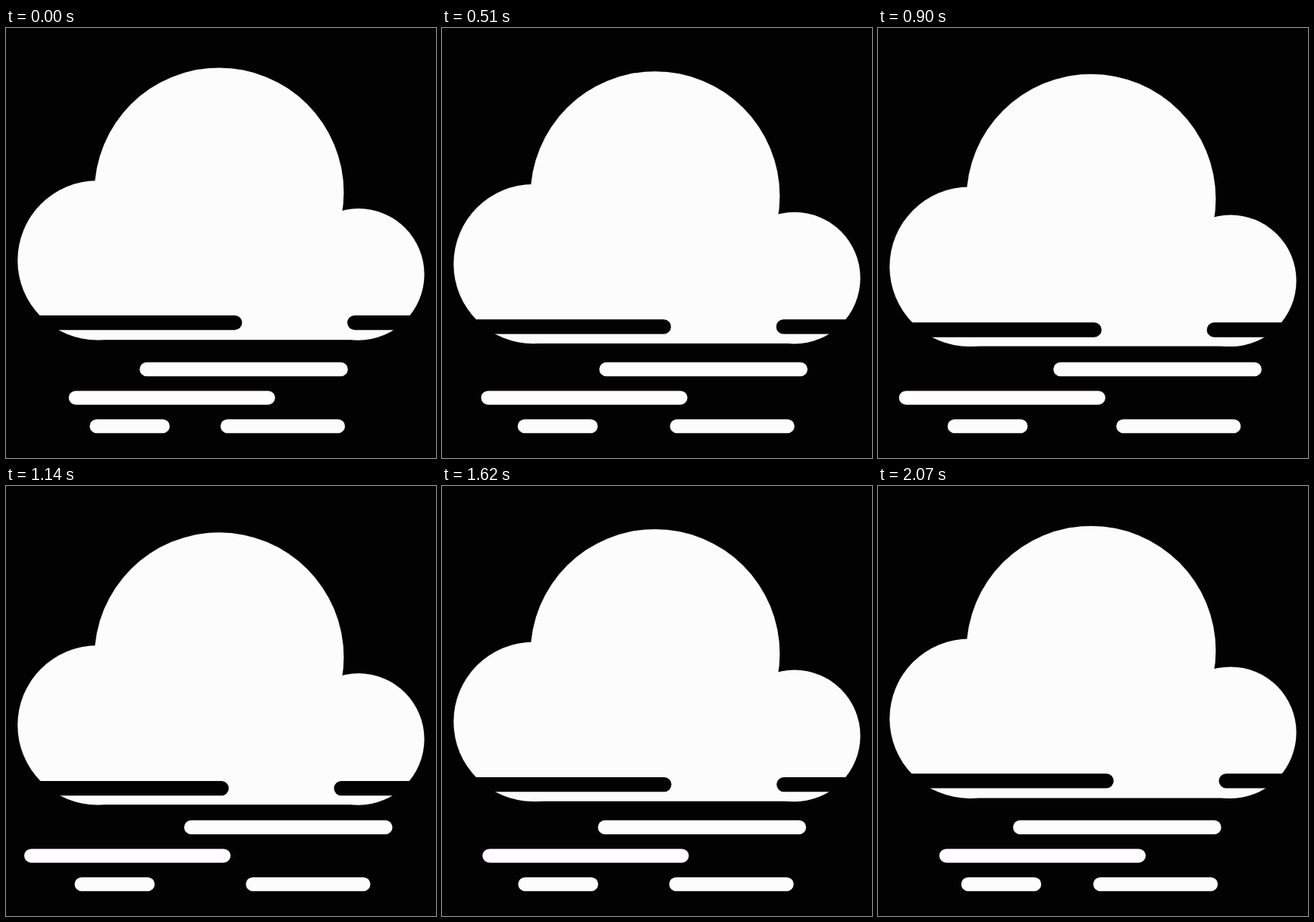
Write an HTML page that moves like this. It is 567 by 567 pixels and loops after 2.1 s.

```html
<!DOCTYPE html>
<html lang="en">
<head>
<meta charset="utf-8">
<title>Foggy cloud</title>
<style>
  html, body { margin: 0; height: 100%; overflow: hidden; background: #020202; }
  svg { display: block; width: 100vw; height: 100vh; }
</style>
</head>
<body>
<svg viewBox="0 0 567 567" fill="#fcfcfc">
  <g data-dy="9.8">
    <circle cx="281" cy="216.8" r="164.4"/>
    <circle cx="120.5" cy="306.4" r="105.2"/>
    <circle cx="464.8" cy="324.9" r="86.8"/>
    <rect x="120" y="250" width="345" height="161.2"/>
  </g>
  <g data-dx="-19.2" data-dy="11" fill="#020202">
    <rect x="-40" y="378.9" width="351.3" height="19.3" rx="9.65"/>
    <rect x="450" y="378.9" width="180" height="19.3" rx="9.65"/>
  </g>
  <rect data-dx="64.2" x="176.2" y="440.8" width="274.6" height="18.4" rx="9.2"/>
  <rect data-dx="-64.2" x="82.7" y="478.4" width="272.1" height="18.4" rx="9.2" fill="#fffdff"/>
  <rect data-dx="-21.7" x="110.3" y="515.9" width="105.6" height="18.4" rx="9.2"/>
  <rect data-dx="36.6" x="282.8" y="515.9" width="164.2" height="18.4" rx="9.2"/>
</svg>
<script>
  const PERIOD = 2100, STEP = 30;
  const movers = document.querySelectorAll('[data-dx], [data-dy]');

  function draw() {
    const t = Math.floor(performance.now() % PERIOD / STEP) * STEP;
    const swing = 1 - Math.abs(1 - 2 * t / PERIOD); // out and back at constant speed
    for (const el of movers) {
      const { dx = 0, dy = 0 } = el.dataset;
      el.setAttribute('transform', `translate(${dx * swing} ${dy * swing})`);
    }
    requestAnimationFrame(draw);
  }
  draw();
</script>
</body>
</html>
```
